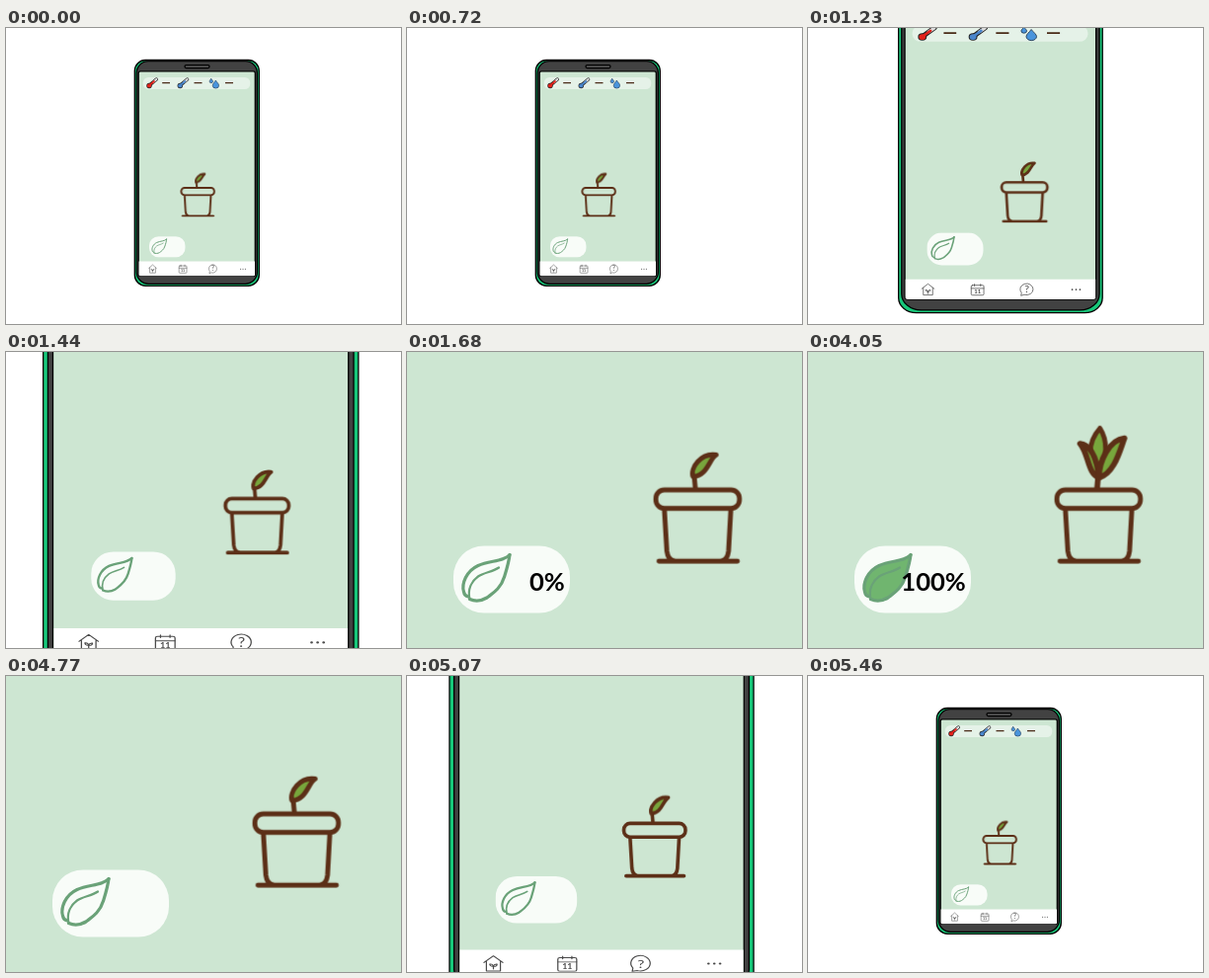
An HTML page that plays this animation: 400x300 px, repeating every 6000 ms.

```html
<!DOCTYPE html>
<html lang="en">
<head>
<meta charset="utf-8">
<title>Plant care app</title>
<style>
  html, body { margin: 0; width: 100%; height: 100%; overflow: hidden; background: #fff; }
  svg { display: block; width: 100vw; height: 100vh; --step: -1; animation: progress 6s infinite; }

  /* Each part travels between its own overview and close-up placement. */
  .zoom { transform: var(--far); animation: zoom 6s infinite; }
  .phone {
    --far: translate(0px, 0px) scale(1, 1);
    --near: translate(-487.5px, -286.5px) scale(3.556, 2.516);
  }
  .pot {
    --far: translate(77.8px, 106.6px) scale(.395, .395);
    --near: translate(-.4px, -.3px) scale(1, 1);
  }
  .badge {
    --far: translate(130.2px, 149.9px) scale(.312, .312);
    --near: translate(0px, 0px) scale(1, 1);
  }
  @keyframes zoom {
    0% { transform: var(--far); }
    18.5% { transform: var(--far); animation-timing-function: steps(20, start); }
    28.5% { transform: var(--near); }
    80% { transform: var(--near); animation-timing-function: steps(23, start); }
    91.5%, 100% { transform: var(--far); }
  }

  /* -1 hides the label; 0 to 4 count quarters. */
  @keyframes progress {
    0% { --step: -1; animation-timing-function: step-end; }
    28% { --step: 0; animation-timing-function: step-end; }
    37.5% { --step: 1; animation-timing-function: step-end; }
    46.5% { --step: 2; animation-timing-function: step-end; }
    57.5% { --step: 3; animation-timing-function: step-end; }
    67.5% { --step: 4; animation-timing-function: step-end; }
    79.5%, 100% { --step: -1; }
  }

  @keyframes sway {
    0%, 2.5% { transform: rotate(0deg); animation-timing-function: steps(10, start); }
    7.5% { transform: rotate(47deg); animation-timing-function: steps(10, start); }
    12.5%, 100% { transform: rotate(0deg); }
  }

  .sprout {
    transform-origin: 293px 137px;
    opacity: calc(2 - var(--step));
    animation: sway 6s infinite;
  }
  .pair {
    transform-origin: 294px 137px;
    transform: scale(calc(1 + .17 * clamp(0, var(--step) - 2, 1)));
    opacity: calc(var(--step) - 1);
  }
  .crown { opacity: calc(var(--step) - 3); }
  .level { transform: translateY(calc(max(var(--step), 0) * -12.25px)); }

  .frame { stroke: #000; stroke-width: 1.3; }
  .frame * { vector-effect: non-scaling-stroke; }
  .ink { fill: none; stroke: #5c2f17; stroke-width: 4.9; stroke-linecap: round; stroke-linejoin: round; }
  .ink .blade { fill: #78a63c; }
  .outline { fill: none; stroke: #6aa278; stroke-width: 3.2; stroke-linecap: round; stroke-linejoin: round; }
  .percent text {
    font: 700 25.6px Lato, sans-serif;
    text-anchor: end;
    opacity: calc(1 - max(var(--step) - var(--i), var(--i) - var(--step)));
  }
  .nav { fill: none; stroke: #4a4a4a; stroke-width: .5; stroke-linecap: round; stroke-linejoin: round; }
  .nav text { font-family: Lato, sans-serif; text-anchor: middle; fill: #4a4a4a; stroke: none; }
</style>
</head>
<body>
<svg viewBox="0 0 400 300">
  <defs>
    <clipPath id="leafShape">
      <path d="M104 205.5C97 213 84 211 72 216.5C60 222 55 235 57.5 243C58 246.5 59.5 247.5 62 248L63.5 250.5C68 252.5 75 252.5 81 249C86 245 95 240 98.5 228C101 220 103 214 104 205.5Z"/>
    </clipPath>
    <g id="thermometer" stroke-linecap="round">
      <path d="M145 58.3L152.3 52" stroke="#222" stroke-width="3.4"/>
      <circle cx="145" cy="58.5" r="2.7" fill="#222"/>
      <path d="M149 54.8L152.3 52" stroke="#ddd" stroke-width="2.2"/>
      <path d="M145 58.3L150 54" stroke="currentColor" stroke-width="1.8"/>
      <circle cx="145" cy="58.5" r="2.1" fill="currentColor"/>
    </g>
  </defs>

  <g class="zoom phone">
    <g class="frame">
      <rect x="130.3" y="32.5" width="126" height="228.8" rx="11" fill="#17c77a"/>
      <rect x="132.2" y="33.6" width="122.2" height="225.7" rx="12" fill="#424242"/>
      <rect x="181" y="37.6" width="25" height="3" rx="1.5" fill="#555"/>
      <rect x="134.2" y="43.8" width="118.1" height="207.6" rx="2" fill="#cde6d2"/>
    </g>
    <path d="M134.6 236.6H252V250a1.3 1.3 0 0 1-1.3 1.3H135.9a1.3 1.3 0 0 1-1.3-1.3Z" fill="#fff"/>

    <rect x="138.8" y="50" width="108.5" height="12" rx="5.5" fill="#fff" fill-opacity=".47"/>
    <use href="#thermometer" color="#e2231c"/>
    <use href="#thermometer" x="31.3" color="#4a86cc"/>
    <g fill="#4a94dc" stroke="#263c55" stroke-width=".6">
      <path d="M212.3 53C213.6 55 215.6 56.6 215.6 58.2A3.2 2.9 0 0 1 209.2 58.2C209.2 56.6 211.2 55 212.3 53Z"/>
      <path d="M207.7 51.2C208.5 52.5 209.5 53.2 209.5 54.1A1.7 1.6 0 0 1 206.1 54.1C206.1 53.2 207.1 52.5 207.7 51.2Z"/>
    </g>
    <path d="M158.2 55.7h7.8M190.5 55.7h8M222 55.7h8" stroke="#4a2b18" stroke-width="1.2"/>

    <g class="nav">
      <path d="M144.6 243.6L148.5 240L152.4 243.6M145.6 243V248.2H151.4V243M148.5 247.2V245.4"/>
      <path d="M148.4 245.7C147.3 245.8 147 245 147 244.4C148 244.3 148.4 244.9 148.4 245.7C148.7 244.7 149.2 244.4 150 244.5C150.1 245.3 149.5 245.9 148.4 245.7"/>
      <rect x="175.2" y="241" width="7.8" height="7.3" rx=".8"/>
      <path d="M175.2 243.3H183M177.2 240.2V241.6M181 240.2V241.6"/>
      <text x="179.1" y="247.2" font-size="3.6" font-weight="700">11</text>
      <path d="M206 248.4L206.3 246.6A4 4.2 0 1 1 208.2 248Z"/>
      <text x="209.6" y="246.4" font-size="6.6">?</text>
      <path d="M237.6 244.2h.01M240 244.2h.01M242.4 244.2h.01" stroke-width="1.1"/>
    </g>
  </g>

  <g class="zoom pot">
    <g class="ink">
      <path class="blade crown" d="M293 125C282 105 285 90 296 77.5C304 90 304 108 294 125Z"/>
      <g class="sprout">
        <path d="M292.3 138L291.3 127"/>
        <path class="blade" d="M290 126.5C287 118 298 102 313.5 104.5C306 109 304.5 126 290 126.5Z"/>
      </g>
      <g class="pair">
        <path d="M293.3 138L294 130"/>
        <path class="blade" d="M278.5 99.5C288 100.5 293 113 295 129C285 126 286 108 278.5 99.5Z"/>
        <path class="blade" d="M295 129C294.5 115 304 96 317 94.7C313 105 308.5 125 295 129Z"/>
      </g>
      <path d="M261 160L263.5 202Q264.5 211 271 212M328.3 160L326 202Q325 211 319 212M255.5 212.3H335"/>
      <rect x="252.4" y="140" width="84.6" height="18.8" rx="8.5" fill="#cde6d2"/>
    </g>
  </g>

  <g class="zoom badge">
    <rect x="47" y="196.5" width="118" height="68" rx="31" fill="#fff" fill-opacity=".85"/>
    <g clip-path="url(#leafShape)">
      <rect class="level" x="54" y="253" width="54" height="52" fill="#70b56f"/>
    </g>
    <g class="outline">
      <path d="M104 205.5C97 213 84 211 72 216.5C60 222 55 235 57.5 243C58 246.5 59.5 247.5 62 248"/>
      <path d="M104 205.5C103 214 101 220 98.5 228C95 240 86 245 81 249C75 252.5 68 252.5 63.5 250.5"/>
      <path d="M63.5 250.5C61 240 66 232 72 227.5C78 223.5 86 223 93 218.5" stroke-width="2.3"/>
    </g>
    <g class="percent">
      <text x="159.8" y="242" style="--i:0">0%</text>
      <text x="159.8" y="242" style="--i:1">25%</text>
      <text x="159.8" y="242" style="--i:2">50%</text>
      <text x="159.8" y="242" style="--i:3">75%</text>
      <text x="159.8" y="242" style="--i:4">100%</text>
    </g>
  </g>
</svg>
</body>
</html>
```
